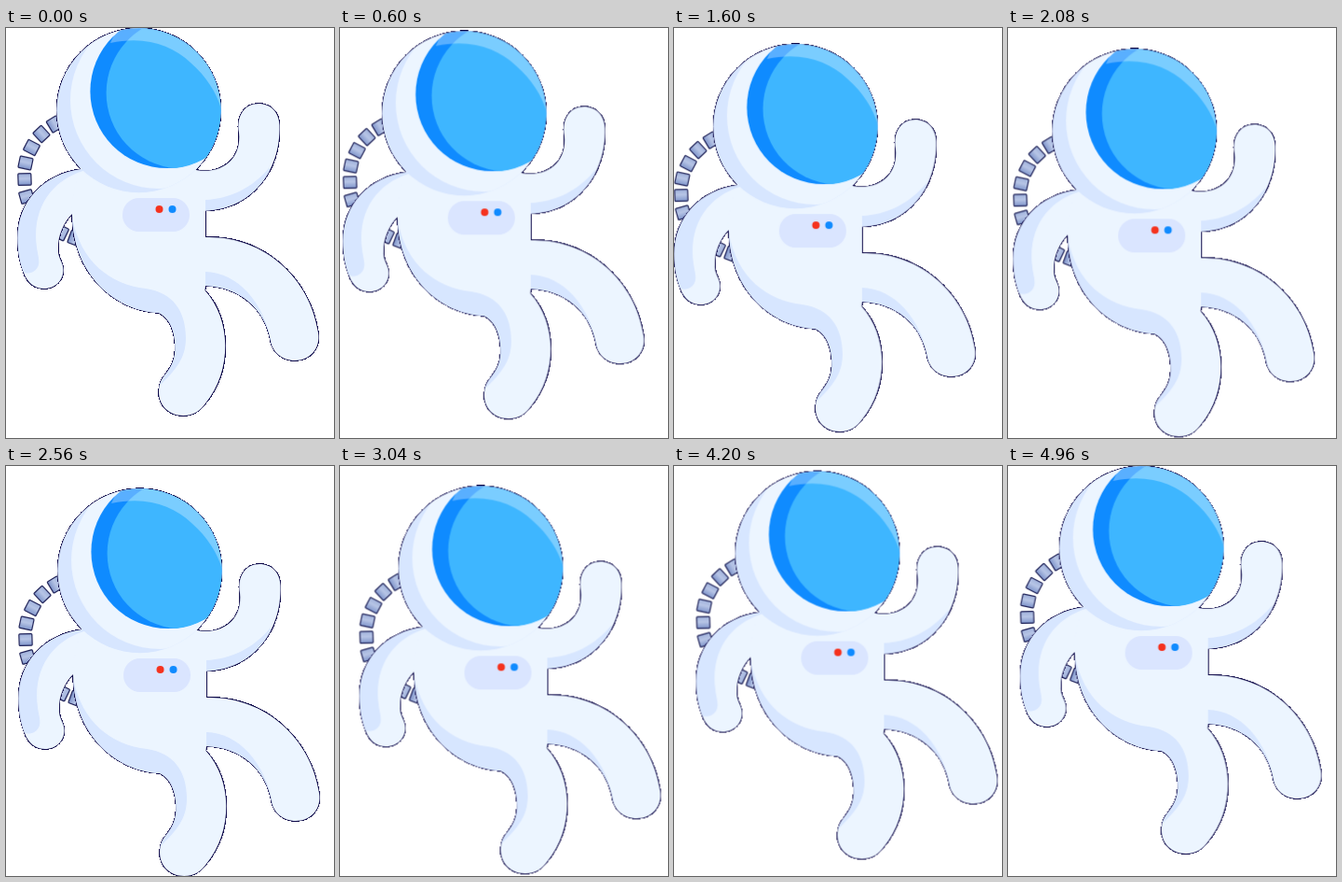
An HTML page that plays this animation: 352x439 px, repeating every 5000 ms.

```html
<!DOCTYPE html>
<html lang="en">
<head>
<meta charset="utf-8">
<title>Floating astronaut</title>
<style>
  html, body { margin: 0; width: 100%; height: 100%; overflow: hidden; background: #fff; }
  svg { display: block; width: 352px; height: 439px; }

  /* Two sine swings a quarter turn apart trace an ellipse. */
  .sway, .bob { animation: 2.5s cubic-bezier(.364, 0, .636, 1) infinite alternate; }
  .sway { animation-name: sway; animation-delay: -1.25s; }
  .bob { animation-name: bob; }
  @keyframes sway { from { transform: translateX(13.5px); } to { transform: translateX(-13.5px); } }
  @keyframes bob { from { transform: translateY(0); } to { transform: translateY(24px); } }

  .edge { fill: #0d0848; stroke: #0d0848; stroke-width: 1.8; shape-rendering: crispEdges; }
  .suit { fill: #ecf5ff; }
  .shade { fill: #d7e6ff; }
  .hose { stroke: #1f2258; stroke-width: 1.2; }
</style>
</head>
<body>
<svg viewBox="0 0 352 439">
  <defs>
    <linearGradient id="metal">
      <stop offset="0" stop-color="#7f95cb"/>
      <stop offset=".55" stop-color="#b7c5e6"/>
      <stop offset="1" stop-color="#a0b2dc"/>
    </linearGradient>
    <rect id="link" x="-6.25" y="-7" width="12.5" height="14" rx="1" fill="url(#metal)"/>

    <circle id="helmet" cx="142.5" cy="88.2" r="88"/>
    <path id="torso" d="M80 150C72 170 70 190 71 200C72 265 118 303 164 305C179 312 182 332 181.500 345C180 370 164 370 164 390C164 404 175 415 190 415C202 415 209 409 214 402C243 367 242 312 213.500 281L214 276V160L200 150Z"/>
    <path id="armL" d="M82 151C40 156 12.500 186 12.500 225C12.500 240 15 252 19 262C23 273 31 279 41 279C53 279 61.500 270 61.500 259C61.500 250 55 246 56 236C55.500 222 62 208 71 199L100 180Z"/>
    <path id="armR" d="M200 151.500L204 152C232 157 253 140 250 112C247 94 256 81 271 81C284 81 293 90 293.500 104C295 155 262 194 214 195.500L200 195Z"/>
    <path id="legR" d="M205 224H214C275 222 326 266 335 326C338 343 326 356 310 356C296 356 286 347 284 335C278 300 250 277 214 276H205Z"/>
    <g id="figure">
      <use href="#legR"/><use href="#armR"/><use href="#armL"/><use href="#torso"/><use href="#helmet"/>
    </g>

    <clipPath id="inHelmet"><use href="#helmet"/></clipPath>
    <clipPath id="inTorso"><use href="#torso"/></clipPath>
    <clipPath id="inArmL"><use href="#armL"/></clipPath>
    <clipPath id="inArmR"><use href="#armR"/></clipPath>
    <clipPath id="inLegR"><use href="#legR"/></clipPath>
  </defs>

  <g class="sway"><g class="bob">
    <g class="hose">
      <use href="#link" transform="translate(52 103) rotate(-31)"/>
      <use href="#link" transform="translate(38 113.500) rotate(-43)"/>
      <use href="#link" transform="translate(27.500 128) rotate(-62)"/>
      <use href="#link" transform="translate(21 144.500) rotate(-78)"/>
      <use href="#link" transform="translate(20 162) rotate(-92)"/>
      <use href="#link" transform="translate(22 180.500) rotate(-106)"/>
      <use href="#link" transform="translate(59 219) rotate(26)"/>
      <use href="#link" transform="translate(74 225) rotate(20)"/>
    </g>

    <use href="#figure" class="edge"/>
    <use href="#figure" class="suit"/>

    <g class="shade">
      <path clip-path="url(#inTorso)" d="M60 200L71 203C80 250 112 275 150 279C179 283 193 303 193 332C193 354 182 366 164 384L140 320L60 280Z"/>
      <path clip-path="url(#inArmL)" d="M90 151C50 160 27 192 33 235C34 243 37 250 34 256C30 263 23 263 19 262L0 262V140Z"/>
      <path clip-path="url(#inArmR)" d="M214 184C240 183 265 171 283 149L287 200H214Z"/>
      <path clip-path="url(#inLegR)" d="M214 261C248 262 277 292 286 341L270 345L214 290Z"/>
    </g>
    <rect x="125" y="182" width="72" height="36" rx="18" fill="#dae5ff"/>
    <circle cx="164.5" cy="194" r="4" fill="#f5321e"/>
    <circle cx="178.5" cy="194" r="4" fill="#108bff"/>

    <use href="#helmet" class="shade"/>
    <g clip-path="url(#inHelmet)">
      <circle class="suit" cx="164" cy="77" r="95"/>
      <circle cx="172.7" cy="67.7" r="82.3" fill="#0f8bff"/>
      <path fill="#3eb6ff" d="M182 -11A80.750 80.750 0 0 0 182 150Q240 143 250 70V-11Z"/>
      <path fill="#fff" fill-opacity=".31" d="M112 16C149 8 178 18 198 37C215 52 226 69 231 87H250V-10H124Z"/>
    </g>
  </g></g>
</svg>
</body>
</html>
```
